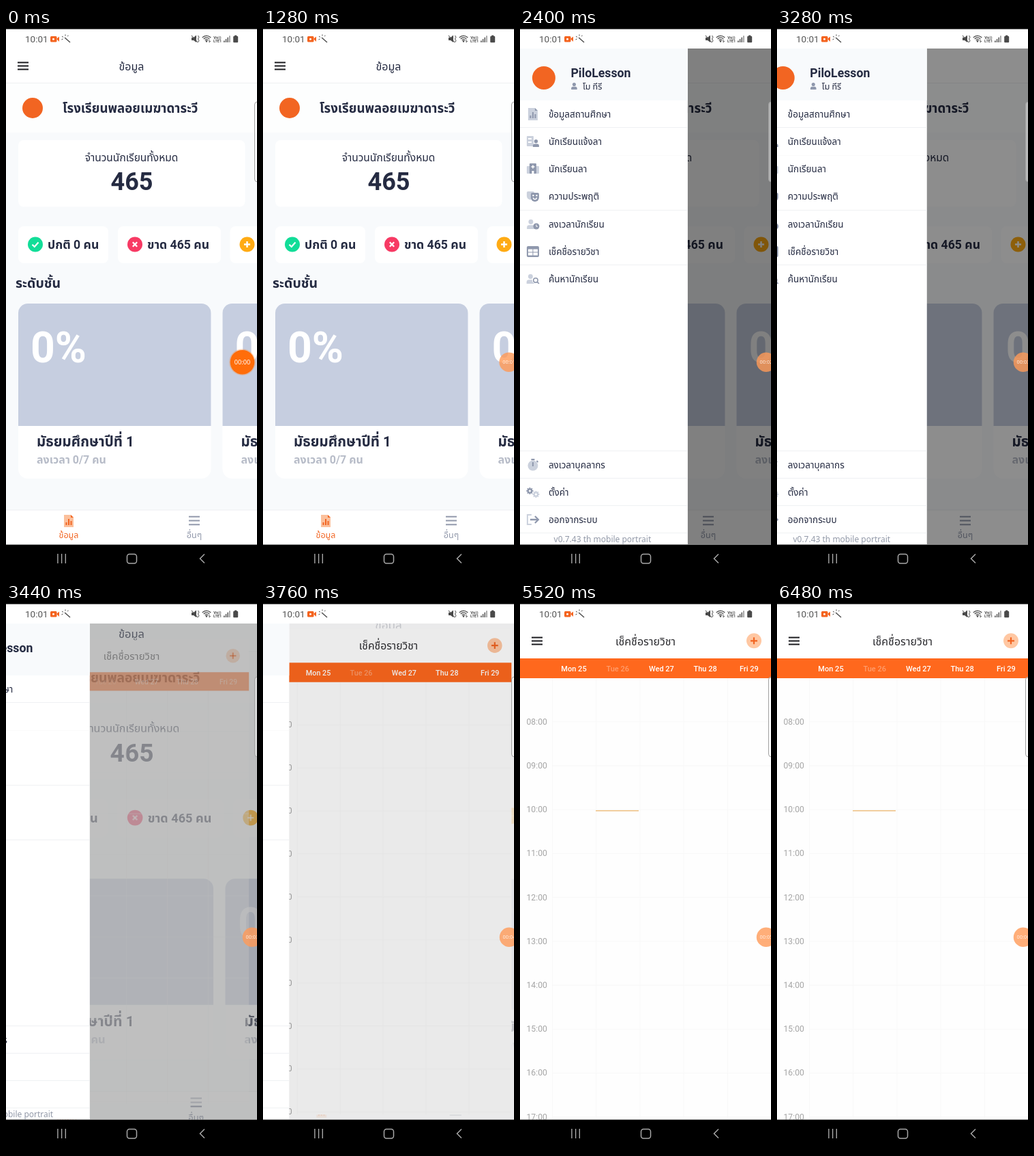
An HTML page with a canvas that plays this animation: 368 by 800 pixels, repeating every 6.56 s.

```html
<!DOCTYPE html>
<html lang="th">
<head>
<meta charset="utf-8">
<title>School app</title>
<style>
  html, body { margin: 0; width: 100%; height: 100%; overflow: hidden; background: #fff; }
  canvas { display: block; width: 368px; height: 800px; }
</style>
</head>
<body>
<canvas id="stage"></canvas>
<script>
const W = 368, H = 800, LOOP = 6560;
const TOP = 30, BOTTOM = 755.6, MENU = 246, MID = { x: 184, y: 395 };
const INK = '#252b42', GRAY = '#8f98ad', PALE = '#cbd1dd', ORANGE = '#f26522', RULE = '#eff1f3';
const SANS = "Roboto, 'Noto Sans Thai Looped', 'Noto Sans Thai', 'Noto Sans', sans-serif";
const WIDE = "'Noto Sans', 'Open Sans', sans-serif";

const canvas = document.getElementById('stage');
const g = canvas.getContext('2d');
const dpr = window.devicePixelRatio || 1;
canvas.width = W * dpr;
canvas.height = H * dpr;

const clamp = v => Math.max(0, Math.min(1, v));
const easeOut = v => 1 - (1 - clamp(v)) ** 3;

function text(s, x, y, size, color, weight = 400, align = 'left', font = SANS) {
  g.font = `${weight} ${size}px ${font}`;
  g.textAlign = align;
  g.fillStyle = color;
  g.fillText(s, x, y);
}
function rect(x, y, w, h, color) {
  g.fillStyle = color;
  g.fillRect(x, y, w, h);
}
function round(x, y, w, h, r, color) {
  g.beginPath();
  g.roundRect(x, y, w, h, r);
  g.fillStyle = color;
  g.fill();
}
function disc(x, y, r, color) {
  g.beginPath();
  g.arc(x, y, r, 0, Math.PI * 2);
  g.fillStyle = color;
  g.fill();
}
function ring(x, y, r, color, width, from = 0, to = Math.PI * 2) {
  g.beginPath();
  g.arc(x, y, r, from, to);
  g.strokeStyle = color;
  g.lineWidth = width;
  g.stroke();
}
function path(points, color, width) {
  g.beginPath();
  for (let i = 0; i < points.length; i += 2) g.lineTo(points[i], points[i + 1]);
  if (width) {
    g.strokeStyle = color;
    g.lineWidth = width;
    g.stroke();
  } else {
    g.fillStyle = color;
    g.fill();
  }
}
function plus(x, y, r, color, width) {
  path([x - r, y, x + r, y], color, width);
  path([x, y - r, x, y + r], color, width);
}
function bars(x, y, w, gap, color) {
  for (let i = -1; i < 2; i++) rect(x - w / 2, y + i * gap - 1, w, 2, color);
}
function person(x, y, s, color) {
  disc(x, y - 3 * s, 3 * s, color);
  round(x - 5 * s, y + s, 10 * s, 5 * s, [3 * s, 3 * s, 0, 0], color);
}
function chartDoc(x, y, paper, ink) {
  path([x - 7, y - 9, x + 3, y - 9, x + 7, y - 5, x + 7, y + 9, x - 7, y + 9], paper);
  path([x + 3, y - 9, x + 7, y - 5, x + 3, y - 5], ink);
  [4, 9, 6].forEach((h, i) => rect(x - 4.5 + i * 3.5, y + 6 - h, 2, h, ink));
}

function statusBar() {
  rect(0, 0, W, TOP, '#fff');
  rect(0, 0, W, 1.6, '#000');
  text('10:01', 28, 21, 13.5, '#555');
  round(65, 12, 9.5, 8.5, 1.5, '#f4631e');
  path([74, 16, 78, 12.5, 78, 20], '#f4631e');
  disc(69.5, 16.2, 1.5, '#fff');
  const c = '#4a4a4a';
  path([86, 14, 94, 21], c, 1.4);
  path([82, 12, 84, 13.5], c, 1);
  path([87, 9.5, 87, 11.5], c, 1);
  path([81.5, 17, 83.5, 16], c, 1);
  path([90, 12, 91.5, 11], c, 1);

  path([272, 14, 275, 14, 279, 10.5, 279, 21, 275, 18, 272, 18], c);
  path([272, 11, 281, 21], c, 1.1);
  path([281.5, 11, 283, 13.5, 281.5, 16, 283, 18.5, 281.5, 21], c, 1);
  for (let r = 3; r < 10; r += 2.8) ring(294, 20, r, c, 1.3, -Math.PI * .76, -Math.PI * .24);
  disc(294, 19.5, 1.3, c);
  path([298, 17, 298, 21, 300, 19], c, .9);
  text('Vo))', 310, 15.5, 6, c, 700, 'center');
  text('LTE1', 310, 21, 5.5, c, 700, 'center');
  for (let i = 0; i < 4; i++) rect(319 + i * 2.7, 18.5 - i * 2.4, 1.7, 2.5 + i * 2.4, i < 3 ? '#666' : '#999');
  round(333.2, 12, 7, 9.3, 1, c);
  rect(335, 10.7, 3.4, 1.6, c);
}

function navBar() {
  rect(0, BOTTOM, W, H - BOTTOM, '#000');
  const c = '#a8a8a8';
  for (let i = -1; i < 2; i++) rect(80.9 + i * 5.7, 769, 1.4, 14, c);
  g.beginPath();
  g.roundRect(177.5, 769.5, 14, 13.5, 3.5);
  g.strokeStyle = c;
  g.lineWidth = 1.5;
  g.stroke();
  path([291, 769.5, 284.5, 776, 291, 782.5], c, 1.5);
}

function header(title, ink) {
  rect(0, TOP, W, 51, '#fff');
  bars(25, 55.5, 16, 5, '#1b1b1f');
  text(title, 184, 61.5, 16, ink, 400, 'center');
}

function gradeCard(x) {
  round(x, 403, 282.5, 256, 14, '#fff');
  round(x, 403, 282.5, 179, [14, 14, 0, 0], '#c6cee0');
  text('0%', x + 18, 488.5, 62.5, '#fff', 700);
  text('มัธยมศึกษาปีที่ 1', x + 27, 612, 20.5, INK, 700);
  text('ลงเวลา 0/7 คน', x + 27, 637, 16, '#b7bcc8', 700);
}

function dashboard() {
  rect(0, TOP, W, BOTTOM - TOP, '#f8fafc');
  header('ข้อมูล', INK);
  rect(0, 81, W, 72, '#fdfefe');
  rect(0, 80, W, 1, '#eef0f2');
  disc(39, 117, 15, ORANGE);
  text('โรงเรียนพลอยเมฆาดาระวี', 83, 124, 18.7, INK, 700);

  round(18, 164, 332.5, 97.5, 8, '#fff');
  text('จำนวนนักเรียนทั้งหมด', 184, 195, 15.5, INK, 400, 'center');
  text('465', 184.5, 237, 36, INK, 700, 'center');

  [[18, 132], [164, 151], [328.5, 140]].forEach(([x, w]) => round(x, 290, w, 54, 8, '#fff'));
  disc(43, 316.5, 11, '#12dd98');
  path([38.5, 316.8, 41.8, 320, 47.5, 313.5], '#fff', 2.2);
  text('ปกติ 0 คน', 61, 323, 17.6, INK, 700);
  disc(189, 316.5, 11, '#f73a64');
  path([185.8, 313.3, 192.2, 319.7], '#fff', 2.3);
  path([192.2, 313.3, 185.8, 319.7], '#fff', 2.3);
  text('ขาด 465 คน', 207, 323, 17.6, INK, 700);
  disc(353.5, 316.5, 11, '#ffab14');
  plus(353.5, 316.5, 4.5, '#fff', 2.4);

  text('ระดับชั้น', 14, 380, 19.5, INK, 700);
  gradeCard(18);
  gradeCard(317.5);

  rect(0, 705, W, BOTTOM - 705, '#fff');
  rect(0, 704.5, W, 1, '#eef0f3');
  chartDoc(92, 721, '#fbc09c', ORANGE);
  text('ข้อมูล', 92, 746, 12.5, ORANGE, 400, 'center');
  bars(276, 720.5, 16, 5.8, '#9299ab');
  text('อื่นๆ', 276, 746, 12.5, '#9299ab', 400, 'center');
}

function timetable(nowLine) {
  const step = 64.2;
  rect(0, TOP, W, BOTTOM - TOP, '#fefefe');
  for (let i = 0; i < 5; i++) rect(47 + i * step, 110, 1, BOTTOM - 110, '#f8f8f8');
  for (let i = 0; i < 10; i++) {
    const y = 173.3 + i * step;
    rect(47, y, W - 47, 1, '#f8f8f8');
    text(String(8 + i).padStart(2, '0') + ':00', 9.5, y + 4.5, 12.2, '#a6a6a6');
  }
  if (nowLine) rect(111, 303, 63, 1.6, '#f0c48a');
  header('เช็คชื่อรายวิชา', '#2a2a2e');
  disc(343, 55.3, 11, '#ffc7a2');
  plus(343, 55.3, 5, ORANGE, 2.2);
  rect(0, 81, W, 29, '#ff681d');
  ['Mon 25', 'Tue 26', 'Wed 27', 'Thu 28', 'Fri 29'].forEach((day, i) =>
    text(day, 79 + i * step, 100, 11, i === 1 ? 'rgba(255,255,255,.35)' : '#fff', 500, 'center'));
}

const menuItems = [
  ['ข้อมูลสถานศึกษา', 126, y => chartDoc(19, y, PALE, GRAY)],
  ['นักเรียนแจ้งลา', 166, y => {
    round(10, y - 8, 10, 15, 1, PALE);
    rect(12, y - 5, 5, 2, '#fff');
    rect(12, y, 5, 2, '#fff');
    person(23.5, y + 2.5, .9, GRAY);
  }],
  ['นักเรียนลา', 206, y => {
    round(10, y - 4, 18, 11, 1, PALE);
    round(14, y - 8, 10, 15, 1, GRAY);
    plus(19, y - 3, 2.5, '#fff', 1.5);
    rect(17.5, y + 3, 3, 4, '#fff');
  }],
  ['ความประพฤติ', 246, y => {
    round(10, y - 7, 11, 12, [2, 2, 6, 6], PALE);
    round(16, y - 5, 12, 13, [2, 2, 6, 6], GRAY);
    disc(19.5, y - 1, 1.2, '#fff');
    disc(24.5, y - 1, 1.2, '#fff');
    ring(22, y + 2, 2.5, '#fff', 1.3, 0, Math.PI);
  }],
  ['ลงเวลานักเรียน', 287, y => {
    person(16, y, 1.15, PALE);
    disc(24, y + 3, 4.5, GRAY);
    path([24, y + .5, 24, y + 3.3, 26, y + 3.3], '#fff', 1);
  }],
  ['เช็คชื่อรายวิชา', 327, y => {
    round(10, y - 8, 18, 16, 2, GRAY);
    for (let i = 0; i < 4; i++) rect(12 + (i % 2) * 7.5, y - 3.5 + (i >> 1) * 5, 6.5, 4, '#fff');
  }],
  ['ค้นหานักเรียน', 367, y => {
    person(15.5, y, 1.15, PALE);
    disc(23, y + 2, 5, '#fff');
    ring(23, y + 2, 3.2, GRAY, 1.5);
    path([25.3, y + 4.3, 28, y + 7], GRAY, 1.7);
  }],
  ['ลงเวลาบุคลากร', 639, y => {
    disc(19, y + 1, 7.5, PALE);
    rect(16.5, y - 9, 5, 2.2, GRAY);
    path([19, y - 4, 19, y + 2], GRAY, 2);
    path([24.5, y - 6, 26.5, y - 4], GRAY, 1.8);
  }],
  ['ตั้งค่า', 679, y => [[14.5, y - 2, GRAY], [23.5, y + 3, PALE]].forEach(([x, cy, c]) => {
    for (let a = 0; a < 8; a++) {
      const u = a * Math.PI / 4;
      path([x, cy, x + 5 * Math.cos(u), cy + 5 * Math.sin(u)], c, 1.8);
    }
    ring(x, cy, 2.8, c, 2);
    disc(x, cy, 1.6, '#fff');
  })],
  ['ออกจากระบบ', 719, y => {
    path([17, y - 7, 11, y - 7, 11, y + 7, 17, y + 7], PALE, 2);
    path([15, y, 26, y], GRAY, 2.4);
    path([22, y - 5, 27, y, 22, y + 5], GRAY, 2.2);
  }]
];

function menu(edge) {
  g.save();
  g.translate(edge - MENU, 0);
  rect(0, TOP, MENU, BOTTOM - TOP, '#fff');
  rect(0, TOP, MENU, 76, '#f8fafc');
  disc(35, 73, 17, ORANGE);
  text('PiloLesson', 74.5, 72, 17.7, INK, 700);
  person(79.5, 85, .85, GRAY);
  text('โม ทีรี', 92, 90, 12.5, INK);
  [145, 266, 346, 618, 658, 698, 738].forEach(y => rect(0, y, MENU, 1, RULE));
  rect(0, 186, MENU, 1, '#fafafa');
  menuItems.forEach(([label, y, icon]) => {
    icon(y);
    text(label, 42, y + 5, 13.5, INK);
  });
  text('v0.7.43 th mobile portrait', 121, 752, 12, '#9299a8', 400, 'center', WIDE);
  g.restore();
}

function edgeHandle() {
  g.beginPath();
  g.roundRect(364.5, 108, 12, 117, 4);
  g.fillStyle = 'rgba(255,255,255,.4)';
  g.fill();
  g.strokeStyle = '#a0a0a0';
  g.lineWidth = 1;
  g.stroke();
}

function recorder(t) {
  const dock = easeOut((t - 1100) / 250);
  const sec = Math.floor((t + 300) / 1000);
  g.save();
  g.translate(346.5 + 14.5 * dock, 488.7);
  g.scale(1 - .2 * dock, 1 - .2 * dock);
  g.globalAlpha = 1 - .2 * dock;
  disc(0, 0, 19.3, `rgba(255,130,40,${.35 * (1 - dock)})`);
  disc(0, 0, 17.8, `rgb(255,${109 + 45 * dock},${10 + 77 * dock})`);
  text('00:0' + sec, 0, 3.3, 9.2, '#fff', 400, 'center', WIDE);
  g.restore();
}

// Draws a page scaled about the middle of the app area.
function layer(scale, alpha, draw) {
  g.save();
  g.globalAlpha = alpha;
  g.translate(MID.x, MID.y);
  g.scale(scale, scale);
  g.translate(-MID.x, -MID.y);
  draw();
  g.restore();
}

function menuEdge(t) {
  if (t < 3250) return MENU * easeOut((t - 2020) / 410);
  return t < 4880 ? MENU * Math.exp((3250 - t) / 275) : 0;
}

function render(t) {
  g.setTransform(dpr, 0, 0, dpr, 0, 0);
  rect(0, 0, W, H, '#fff');
  g.save();
  g.beginPath();
  g.rect(0, TOP, W, BOTTOM - TOP);
  g.clip();
  const rest = t < 3320 ? 1 : t < 4880 ? Math.exp((3320 - t) / 275) : 0;
  if (rest > .02) layer(1 + .085 * (1 - rest), rest, dashboard);
  if (rest < 1) layer(1 - .1 * rest, Math.min(1, 1.25 * (1 - rest)), () => timetable(t >= 4880));
  const edge = menuEdge(t);
  if (edge > 0) {
    rect(0, TOP, W, BOTTOM - TOP, `rgba(0,0,0,${.5 * edge / MENU})`);
    menu(edge);
  }
  g.restore();
  statusBar();
  navBar();
  edgeHandle();
  recorder(t);
}

const start = performance.now();
function tick() {
  render((performance.now() - start) % LOOP);
  requestAnimationFrame(tick);
}
tick();
</script>
</body>
</html>
```
